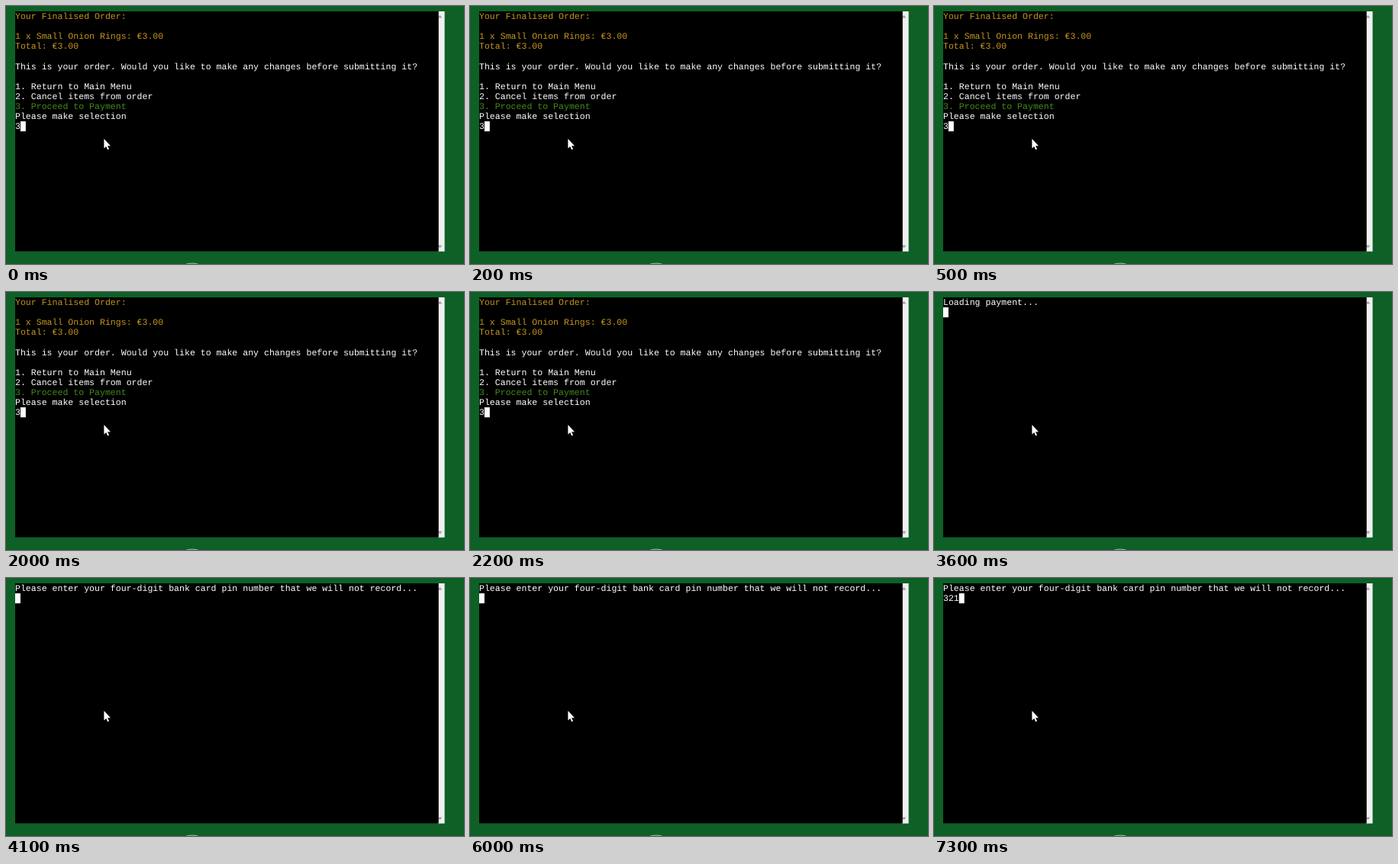
An HTML page for the animation above (8 s loop, 600 px wide and 338 px high).

```html
<!DOCTYPE html>
<html lang="en">
<head>
<meta charset="utf-8">
<title>Order terminal</title>
<style>
  html, body { margin: 0; width: 100%; height: 100%; overflow: hidden; background: #0e6027; }
  svg { position: absolute; left: 0; top: 0; }
  /* an 80 x 24 terminal with 9 x 17 cells, scaled down */
  #term {
    position: absolute; left: 11.6px; top: 7px; width: 720px; height: 408px;
    transform: scale(.7705); transform-origin: 0 0; background: #000;
  }
  pre {
    position: absolute; left: 0; top: .5px; margin: 0; color: #fff;
    font: 15px/17px "Liberation Mono", "Courier New", monospace;
    text-rendering: geometricPrecision;
  }
  #caret { position: absolute; width: 9px; height: 17px; background: #fff; }
  .gold { color: #c4951a; }
  .green { color: #43891a; }
</style>
</head>
<body>
<svg width="600" height="338">
  <rect x="566" y="7" width="8.6" height="314.6" fill="#f0f0f0"/>
  <path d="M565.5 15.5h6l-3-3.5zM565.5 313.5h6l-3 3.5z" fill="#a0a0a0"/>
  <circle cx="244" cy="364" r="27" fill="none" stroke="#b4c3a6"/>
</svg>
<div id="term"><pre id="text"></pre><div id="caret"></div></div>
<svg width="600" height="338">
  <path d="M128.4 174v12.6l2.8-2.7 1.9 4.4 1.9-.8-1.9-4.3h3.9z" fill="#fff"/>
</svg>
<script>
const LOOP = 8000;
const text = document.getElementById("text");
const caret = document.getElementById("caret");

const order = `<span class="gold">Your Finalised Order:

1 x Small Onion Rings: €3.00
Total: €3.00</span>

This is your order. Would you like to make any changes before submitting it?

1. Return to Main Menu
2. Cancel items from order
<span class="green">3. Proceed to Payment</span>
Please make selection
3`;
const loading = "Loading payment";
const prompt = "Please enter your four-digit bank card pin number that we will not record...\n";

// start time, screen text, caret column, caret row
const steps = [
  [0, order, 1, 11],
  [2800, "", 0, 0],
  [3000, loading + ".", 0, 1],
  [3300, loading + "..", 0, 1],
  [3600, loading + "...", 0, 1],
  [3900, prompt, 0, 1],
  [6800, prompt + "32", 2, 1],
  [7300, prompt + "321", 3, 1]
];

let shown;
function draw(now) {
  const t = now % LOOP;
  const step = steps.findLast(s => s[0] <= t);
  if (step !== shown) {
    const [, html, col, row] = shown = step;
    text.innerHTML = html;
    caret.style.left = col * 9 + "px";
    caret.style.top = row * 17 + "px";
  }
  requestAnimationFrame(draw);
}
draw(performance.now());
</script>
</body>
</html>
```
